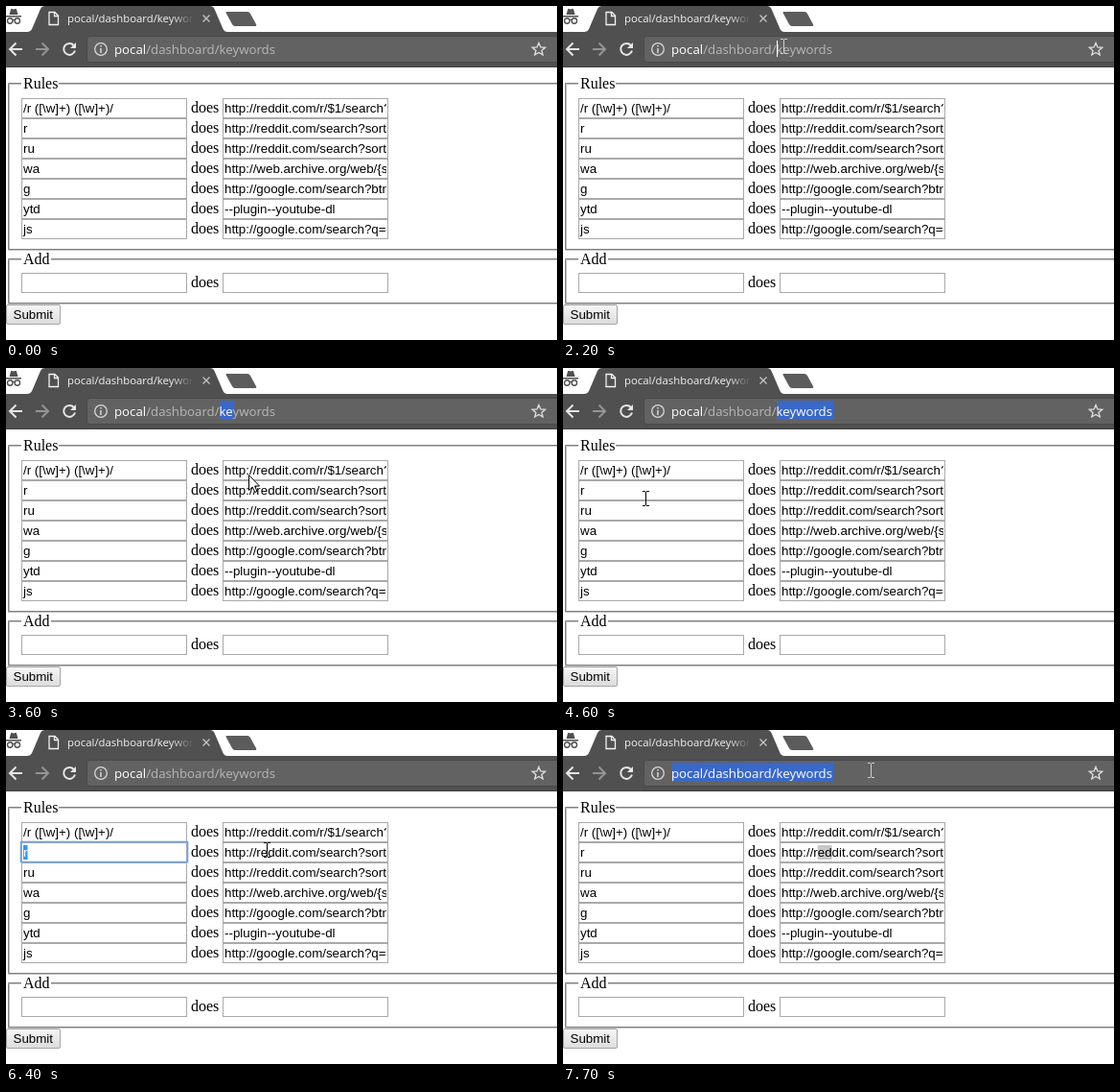
An HTML page that plays this animation: 575x348 px, repeating every 8000 ms.

```html
<!DOCTYPE html>
<html lang="en">
<head>
<meta charset="utf-8">
<title>Keyword rules</title>
<style>
  html, body { margin: 0; width: 100%; height: 100%; overflow: hidden; background: #fff; }
  svg { display: block; }
  text { white-space: pre; }
  .ui { font-family: "Open Sans", sans-serif; }
  .serif { font: 16px "Liberation Serif", serif; }
  .sans { font: 13.333px "Liberation Sans", sans-serif; }
  .line { fill: none; stroke: #e6e6e6; stroke-width: 2; }
  .field { fill: #fff; stroke: #a9a9a9; }
</style>
</head>
<body>
<svg width="575" height="348" viewBox="0 0 575 348">
  <defs>
    <linearGradient id="fade"><stop stop-color="#505050" stop-opacity="0"/><stop offset="1" stop-color="#505050"/></linearGradient>
    <linearGradient id="face" x2="0" y2="1"><stop stop-color="#f6f6f6"/><stop offset="1" stop-color="#dcdcdc"/></linearGradient>
    <clipPath id="values"><rect x="228" y="90" width="169" height="160"/></clipPath>
  </defs>

  <!-- tab strip -->
  <g fill="#505050">
    <path d="M3.500 9L5 3.500Q5.500 2.500 6.500 3L8 3.500 9.500 3Q10.500 2.500 11 3.500L12.500 9ZM0 10H16V11.500H0Z"/>
    <path d="M1.500 15.500a2.700 2.700 0 1 0 5.400 0a2.700 2.700 0 1 0-5.400 0M9.100 15.500a2.700 2.700 0 1 0 5.400 0a2.700 2.700 0 1 0-5.400 0M6.500 15Q8 13.800 9.500 15" fill="none" stroke="#505050" stroke-width="1.400"/>
    <path d="M22 27Q25.500 27 27 24L36 3Q37.500 0 40 0H213Q216 0 217.500 3L226.500 24Q228 27 231 27Z"/>
    <path d="M230 6H252Q254 6 255 8L261 19Q262 21 260 21H239Q237 21 236 19L230 8Q229 6 230 6Z" fill="#5c5c5c"/>
  </g>
  <path d="M45 6.500H51L54.500 10V19.500H45ZM50.500 6.500V10.500H54.500" fill="none" stroke="#f2f2f2" stroke-width="1.300"/>
  <text class="ui" x="64" y="17" font-size="11.350" fill="#f2f2f2">pocal/dashboard/keywor</text>
  <path d="M172 4H196V23H172Z" fill="url(#fade)"/>
  <path d="M205.500 9.500L212.500 16.500M212.500 9.500L205.500 16.500" stroke="#c4c4c4" stroke-width="1.300"/>

  <!-- toolbar -->
  <path d="M0 27H575V64H0Z" fill="#505050"/>
  <path d="M0 63.500H575" stroke="#404040"/>
  <path class="line" d="M17 45H4.500M10.500 38.500L4 45L10.500 51.500"/>
  <path class="line" d="M31 45H43.500M37.500 38.500L44 45L37.500 51.500" opacity=".45"/>
  <path class="line" d="M70.800 41A6 6 0 1 0 72 46.500"/>
  <path d="M73 38V44H67Z" fill="#e6e6e6"/>
  <rect x="84.500" y="31.500" width="500" height="27" rx="3" fill="#626262" stroke="#484848"/>
  <circle cx="99" cy="45" r="6.300" fill="none" stroke="#d8d8d8" stroke-width="1.300"/>
  <path d="M99 44V49M99 41V42.500" stroke="#d8d8d8" stroke-width="1.500"/>
  <path d="M556 38.500L557.900 43L562.700 43.300L559 46.400L560.200 51L556 48.500L551.800 51L553 46.400L549.300 43.300L554.100 43Z" fill="none" stroke="#e0e0e0" stroke-width="1.300"/>
  <rect id="urlSel" y="34" height="20" fill="#3a68c8"/>
  <text class="ui" x="113" y="50" font-size="13.250" fill="#b8b8b8"><tspan fill="#fff">pocal</tspan><tspan id="path">/dashboard/</tspan><tspan id="ke">ke</tspan><tspan id="rest">ywords</tspan></text>
  <path id="urlCaret" d="M223.500 36V53" stroke="#fff"/>

  <!-- page -->
  <g id="page"></g>
  <rect id="keySel" x="18" y="120" width="4.500" height="15" fill="#3297fd"/>
  <text id="keyText" class="sans" x="18" y="132">r</text>
  <path id="keyCaret" d="M18.500 120V135" stroke="#000"/>
  <rect id="ring" y="116.500" width="174" height="21" fill="none" stroke="#6ba3ee" stroke-width="1.600"/>
  <rect x=".5" y="311.500" width="56" height="20" rx="1.500" fill="url(#face)" stroke="#a6a6a6"/>
  <text class="sans" x="7.500" y="326">Submit</text>

  <path id="beam" d="M-3-7.500H0M1-7.500H4M-3 7.500H0M1 7.500H4M.5-7V7"/>
  <path id="arrow" d="M.5.500V16.500L4.200 13L6.800 18.500L9 17.500L6.600 12H11.500Z" fill="#fff" stroke="#000"/>
</svg>
<script>
const $ = id => document.getElementById(id);
const set = (id, attrs) => { for (const k in attrs) $(id).setAttribute(k, attrs[k]); };
const show = (id, on) => set(id, { visibility: on ? 'visible' : 'hidden' });

const rules = [
  ['/r ([\\w]+) ([\\w]+)/', 'http://reddit.com/r/$1/search?'],
  ['', 'http://reddit.com/search?sort='],
  ['ru', 'http://reddit.com/search?sort='],
  ['wa', 'http://web.archive.org/web/{s'],
  ['g', 'http://google.com/search?btn'],
  ['ytd', '--plugin--youtube-dl'],
  ['js', 'http://google.com/search?q={']
];

const field = (x, y) => `<rect class="field" x="${x + .5}" y="${y + .5}" width="172" height="20"/>`;
const row = ([key, value], y) => field(16, y) + field(226, y) +
  `<text class="serif" x="193" y="${y + 15}">does</text>
   <text class="sans" x="18" y="${y + 15}">${key}</text>
   <text class="sans" x="228" y="${y + 15}" clip-path="url(#values)">${value}</text>`;

// Grooved frame whose right side lies beyond the stage
const group = (title, top, bottom, gap) => `
  <path d="M600 ${top + .5}H2.500V${bottom - 1.500}H600" fill="none" stroke="#808080"/>
  <path d="M600 ${top + 1.500}H3.500V${bottom - 2}M2 ${bottom - .5}H600" fill="none" stroke="#c0c0c0"/>
  <path d="M16 ${top - 3}h${gap}v8h-${gap}Z" fill="#fff"/>
  <text class="serif" x="18" y="${top + 6}">${title}</text>`;

$('page').innerHTML = group('Rules', 80, 255, 39) + group('Add', 263, 311, 31) +
  '<rect id="valueSel" x="265.800" y="120" width="14.800" height="15"/>' +
  rules.map((r, i) => row(r, 96 + 21 * i)).join('') + row(['', ''], 278);
// The highlight sits above the field but below its text
$('page').querySelectorAll('.field')[3].after($('valueSel'));

// Pointer stops: time, x, y, shape (a = arrow, b = text beam)
const stops = [
  [500, 564, 132, 'a'], [700, 340, 135, 'a'], [800, 225, 137, 'a'], [900, 186, 136, 'b'],
  [1000, 185, 130, 'b'], [1200, 188, 76, 'a'], [1300, 191, 57, 'b'],
  [1500, 208, 44, 'b'], [1700, 224, 38, 'b'], [1900, 224, 38, 'b'],
  [2200, 230, 42, 'b'], [2500, 301, 46, 'b'], [2700, 301, 46, 'b'],
  [2800, 303, 46, 'b'], [2900, 303, 46, 'b'], [3100, 303, 50, 'b'], [3300, 303, 50, 'b'],
  [3400, 292, 64, 'a'], [3600, 253, 111, 'a'], [3700, 251, 113, 'a'], [3900, 251, 113, 'a'],
  [4000, 249, 113, 'a'], [4100, 249, 113, 'a'], [4300, 88, 135, 'a'], [4400, 88, 136, 'b'],
  [4500, 88, 136, 'b'], [4600, 86, 136, 'b'], [4900, 86, 136, 'b'], [5100, 83, 135, 'b'],
  [5600, 83, 135, 'b'], [5800, 150, 130, 'b'], [6000, 270, 118, 'b'], [6100, 270, 118, 'b'],
  [6300, 272, 125, 'b'], [6800, 272, 125, 'b'], [7000, 282, 98, 'a'],
  [7100, 289, 76, 'a'], [7200, 300, 57, 'b'], [7500, 321, 42, 'b'], [8000, 321, 42, 'b']
];

function pointerAt(t) {
  const i = stops.findIndex(s => s[0] > t) - 1;
  if (i < 0) return null;
  const [t0, x0, y0, shape] = stops[i], [t1, x1, y1] = stops[i + 1];
  const mix = (a, b) => Math.round(a + (b - a) * (t - t0) / (t1 - t0));
  return { x: mix(x0, x1), y: mix(y0, y1), shape };
}

function draw(now) {
  const t = Math.floor(now % 8000 / 100) * 100;
  const between = (a, b) => t >= a && t < b;

  const p = pointerAt(t);
  show('beam', p && p.shape === 'b');
  show('arrow', p && p.shape === 'a');
  if (p) {
    const transform = `translate(${p.x} ${p.y})`;
    set('beam', { transform, stroke: p.y < 64 ? '#d0d0d0' : '#000' });
    set('arrow', { transform });
  }

  const all = t >= 7600, word = between(4200, 5300), part = between(2400, 4200);
  set('urlSel', { x: all ? 113 : 223, width: all ? 169 : word ? 59 : part ? 15 : 0 });
  const ink = on => ({ fill: on ? '#fff' : '#b8b8b8' });
  set('path', ink(all));
  set('ke', ink(all || word || part));
  set('rest', ink(all || word));
  show('urlCaret', between(2000, 2400));

  const keySelected = between(5500, 6500);
  show('keySel', keySelected);
  set('keyText', { fill: keySelected ? '#fff' : '#000' });
  show('keyCaret', between(5300, 5500));
  show('ring', between(5300, 7600));
  set('ring', { x: t < 6500 ? 15.5 : 225.5 });
  show('valueSel', t >= 6600);
  set('valueSel', { fill: all ? '#c8c8c8' : '#3297fd' });

  requestAnimationFrame(draw);
}
requestAnimationFrame(draw);
</script>
</body>
</html>
```
